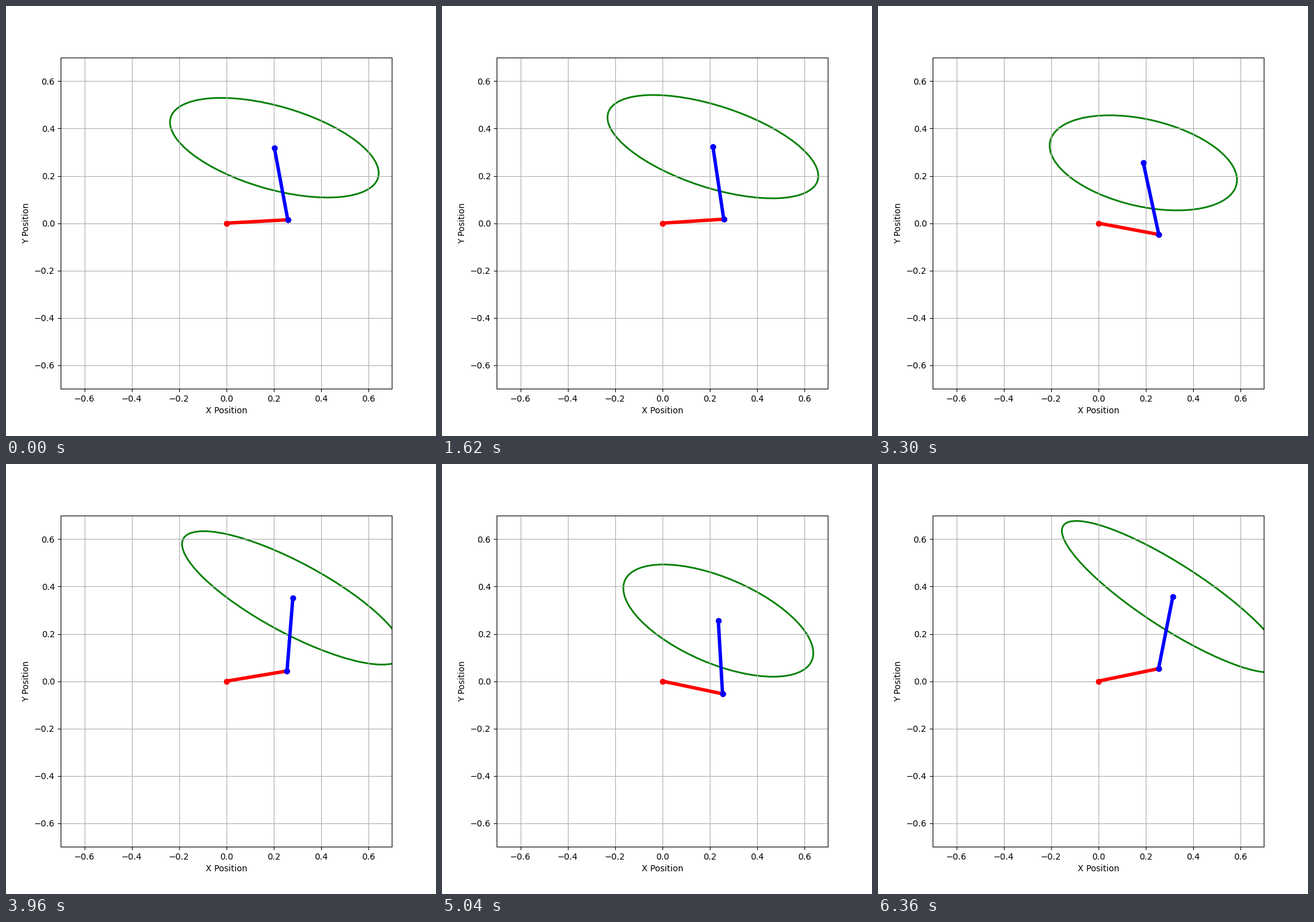
A matplotlib script for the animation above (6420 ms loop, 700x700 px).

```python
import numpy as np
import matplotlib.pyplot as plt
from matplotlib.animation import FuncAnimation
from matplotlib.patches import Ellipse

L1, L2 = 0.26, 0.31
FRAMES, INTERVAL = 107, 60

# Hand path: step, x, y
PATH = np.array([
    (0, 0.2028, 0.3190), (7, 0.2680, 0.3040), (11, 0.2450, 0.3010),
    (16, 0.2028, 0.2950), (20, 0.2700, 0.2850), (23, 0.3080, 0.2780),
    (27, 0.2136, 0.3234), (30, 0.2000, 0.3330), (33, 0.2150, 0.3220),
    (39, 0.3500, 0.2650), (44, 0.2864, 0.2974), (49, 0.2000, 0.3200),
    (55, 0.1900, 0.2550), (61, 0.3930, 0.2620), (66, 0.2810, 0.3520),
    (71, 0.1900, 0.3250), (77, 0.1670, 0.2620), (84, 0.2365, 0.2560),
    (88, 0.3850, 0.2360), (92, 0.3950, 0.2680), (99, 0.3000, 0.3180),
    (106, 0.3147, 0.3570),
])


def smooth(t, keys, vals):
    """Shape-preserving cubic through the keys, without overshoot."""
    h = np.diff(keys)
    d = np.diff(vals) / h
    m = np.zeros_like(vals)
    same = d[:-1] * d[1:] > 0
    m[1:-1][same] = 2 * d[:-1][same] * d[1:][same] / (d[:-1] + d[1:])[same]
    m[0], m[-1] = d[0], d[-1]
    i = np.clip(np.searchsorted(keys, t, side="right") - 1, 0, len(h) - 1)
    s = (t - keys[i]) / h[i]
    return ((1 + 2 * s) * (1 - s) ** 2 * vals[i] + s * (1 - s) ** 2 * h[i] * m[i]
            + s * s * (3 - 2 * s) * vals[i + 1] + s * s * (s - 1) * h[i] * m[i + 1])


def solve(x, y):
    """Joint angles that put the hand at (x, y)."""
    c2 = (x * x + y * y - L1 ** 2 - L2 ** 2) / (2 * L1 * L2)
    q2 = np.arccos(np.clip(c2, -1, 1))
    q1 = np.arctan2(y, x) - np.arctan2(L2 * np.sin(q2), L1 + L2 * np.cos(q2))
    return q1, q2


steps = np.arange(FRAMES)
hand = np.column_stack([smooth(steps, PATH[:, 0], PATH[:, k]) for k in (1, 2)])

fig, ax = plt.subplots(figsize=(7, 7), dpi=100)
ax.set_xlim(-0.7, 0.7)
ax.set_ylim(-0.7, 0.7)
ax.set_aspect("equal")
ax.set_xlabel("X Position")
ax.set_ylabel("Y Position")
ax.grid(True)

upper, = ax.plot([], [], "ro-", lw=4)
fore, = ax.plot([], [], "bo-", lw=4)
ellipse = Ellipse((0, 0), 1, 1, edgecolor="green", facecolor="none", lw=2)
ax.add_patch(ellipse)


def update(i):
    x, y = hand[i]
    q1, _ = solve(x, y)
    ex, ey = L1 * np.cos(q1), L1 * np.sin(q1)
    upper.set_data([0, ex], [0, ey])
    fore.set_data([ex, x], [ey, y])

    # Manipulability ellipse from the arm's Jacobian
    jac = np.array([[-y, ey - y], [x, x - ex]])
    vals, vecs = np.linalg.eigh(jac @ jac.T)
    ellipse.set_center((x, y))
    ellipse.width, ellipse.height = 2 * np.sqrt(vals[::-1])
    ellipse.angle = np.degrees(np.arctan2(vecs[1, 1], vecs[0, 1]))
    return upper, fore, ellipse


anim = FuncAnimation(fig, update, frames=FRAMES, interval=INTERVAL,
                     repeat=True, repeat_delay=0)
plt.show()
```
